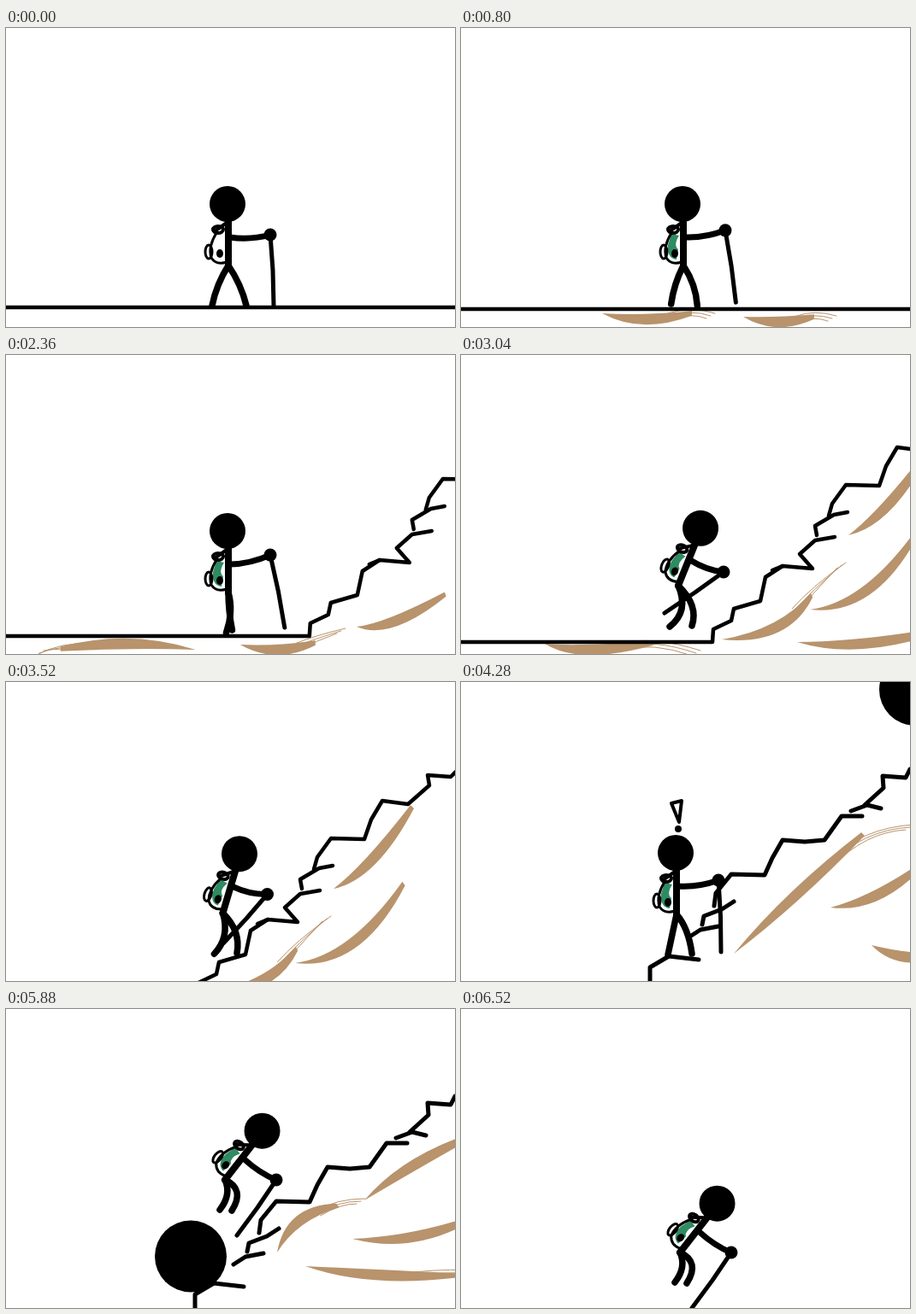
Write an HTML page with a canvas that moves like this. It is 525 px wide and 350 px high and loops after 6.56 s.

```html
<!DOCTYPE html>
<html lang="en">
<head>
<meta charset="utf-8">
<title>Stick hiker</title>
<style>
html, body { margin: 0; width: 100%; height: 100%; overflow: hidden; background: #fff; }
canvas { display: block; }
</style>
</head>
<body>
<canvas id="stage" width="525" height="350"></canvas>
<script>
const ctx = document.getElementById('stage').getContext('2d');
const LOOP = 6560, STEP = 40, BROWN = '#b8936c', GREEN = '#2f8b62';

const mix = (a, b, u) => a.map((v, i) => v + (b[i] - v) * u);

// Interpolates [time, values] keys linearly, holding both ends.
function at(keys, t) {
  const i = keys.findIndex(k => k[0] > t);
  if (i < 0) return keys[keys.length - 1][1];
  if (i === 0) return keys[0][1];
  const [t0, a] = keys[i - 1], [t1, b] = keys[i];
  return mix(a, b, (t - t0) / (t1 - t0));
}

// ---- scenery ----
const drift = [
  [0, [372, -9]], [80, [358, -7]], [800, [245, -7]], [1440, [145, -7]], [1840, [107, -7]],
  [2920, [11, -7]], [3040, [0, 0]], [3520, [-70, 31]]
];
const approach = [
  [-900, 336, 294, 336, 295, 321, 316, 311, 319, 297, 350, 288, 356, 260, 376, 247],
  [364, 252, 376, 247, 411, 250, 396, 233, 414, 217, 437, 213],
  [416, 211, 414, 200, 436, 187, 452, 184],
  [430, 188, 434, 174, 450, 152, 489, 153, 497, 130, 510, 108, 540, 112, 565, 90, 563, 78, 590, 80, 610, 60]
];
const slope = [
  [221, 356, 221, 334, 243, 321, 278, 325],
  [266, 299, 280, 290, 301, 286],
  [282, 284, 284, 274, 305, 266, 319, 257],
  [296, 262, 298, 247, 316, 225, 355, 226, 364, 206, 376, 185, 402, 187, 425, 185, 445, 157, 469, 157],
  [456, 151, 475, 144, 491, 148],
  [472, 144, 494, 124, 493, 110, 520, 112, 525, 102, 560, 96, 720, 50]
];

// Brush swipes: start, middle, end and optional tip of the dry bristles.
const earth = [
  { from: 80, ref: 800, swipes: [
    [165, 334, 214, 341, 270, 334, 292, 337], [330, 338, 370, 344, 413, 338, 434, 340]] },
  { from: 1520, ref: 1840, swipes: [
    [268, 345, 190, 338, 110, 344, 85, 349], [320, 339, 363, 345, 408, 337, 438, 323],
    [456, 318, 500, 312, 560, 280]] },
  { from: 2920, ref: 3040, swipes: [
    [98, 338, 150, 345, 225, 337, 275, 349], [305, 333, 368, 319, 410, 281, 445, 246],
    [453, 211, 497, 178, 545, 115], [408, 298, 475, 275, 535, 205], [393, 336, 470, 338, 560, 322]] },
  { from: 3600, swipes: [
    [319, 318, 391, 250, 470, 178, 525, 170], [432, 264, 485, 250, 540, 213],
    [480, 308, 515, 321, 560, 322]] },
  { from: 4600, swipes: [
    [317, 285, 343, 248, 388, 230, 415, 225], [419, 224, 475, 184, 545, 148],
    [405, 269, 475, 267, 545, 245], [350, 301, 430, 311, 525, 312, 545, 310]] }
];

function pen(width, color = '#000') {
  ctx.lineWidth = width;
  ctx.strokeStyle = ctx.fillStyle = color;
}

function line(pts, width) {
  pen(width);
  ctx.beginPath();
  for (let i = 0; i < pts.length; i += 2) ctx.lineTo(pts[i], pts[i + 1]);
  ctx.stroke();
}

function curve(x0, y0, cx, cy, x1, y1, width) {
  pen(width);
  ctx.beginPath();
  ctx.moveTo(x0, y0);
  ctx.quadraticCurveTo(cx, cy, x1, y1);
  ctx.stroke();
}

function oval(x, y, rx, ry = rx) {
  ctx.beginPath();
  ctx.ellipse(x, y, rx, ry, 0, 0, 7);
}

function disc(x, y, r, ry = r) {
  pen(1);
  oval(x, y, r, ry);
  ctx.fill();
}

function swipe([x0, y0, mx, my, x1, y1, hx, hy]) {
  const cx = 2 * mx - (x0 + x1) / 2, cy = 2 * my - (y0 + y1) / 2;
  const len = Math.hypot(x1 - x0, y1 - y0);
  const nx = (y0 - y1) / len * 11, ny = (x1 - x0) / len * 11;
  pen(1, BROWN);
  ctx.beginPath();
  ctx.moveTo(x0, y0);
  ctx.quadraticCurveTo(cx + nx, cy + ny, x1 + nx / 4, y1 + ny / 4);
  ctx.lineTo(x1 - nx / 4, y1 - ny / 4);
  ctx.quadraticCurveTo(cx - nx, cy - ny, x0, y0);
  ctx.fill();
  if (hx === undefined) return;
  for (let i = -1; i < 2; i++) {
    ctx.beginPath();
    ctx.moveTo((mx + x1) / 2 + nx * i / 3, (my + y1) / 2 + ny * i / 3);
    ctx.quadraticCurveTo(x1 + nx * i / 3, y1 + ny * i / 3 - 5, hx - i * 5, hy + i * 3);
    ctx.stroke();
  }
}

function scenery(t) {
  const base = at(drift, t);
  const late = t >= 3600;
  const drop = Math.max(0, (t - 5920) / 600) ** 1.5;
  const scene = late ? [-110 * drop, 320 * drop] : base;

  const set = earth.filter(e => e.from <= t).pop();
  if (set) {
    const ref = set.ref ? at(drift, set.ref) : [0, 0];
    const [x, y] = late ? scene : [base[0] - ref[0], base[1] - ref[1]];
    ctx.save();
    ctx.translate(x, y);
    set.swipes.forEach(swipe);
    ctx.restore();
  }
  ctx.save();
  ctx.translate(...scene);
  (late ? slope : approach).forEach(s => line(s, late ? 5 : 4.5));
  ctx.restore();
}

// ---- hiker: lean, then x/y of hip, hand, stick tip, knee and foot twice ----
const leap = [22, 254, 270, 307, 254, 238, 302, 267, 300, 244, 318, 278, 293, 270, 317];
const stand = [0, 252, 272, 301, 232, 304, 316, 247, 296, 242, 319, 266, 288, 270, 318];
const crouch = [16, 256, 278, 313, 257, 289, 338, 260, 297, 243, 320, 277, 288, 270, 318];
const tuck = [38, 256, 285, 316, 285, 270, 350, 264, 302, 250, 320, 280, 296, 264, 321];
const raised = tuck.map((v, i) => i && i % 2 === 0 ? v - 85 : v);

function walk(t) {
  const a = t / 720 * 2 * Math.PI, c = 20 * Math.cos(a), s = Math.sin(a);
  const up = Math.max(0, s), down = Math.max(0, -s);
  return [0, 260, 278, 309, 242 - 8 * up, 313 + 13 * up, 325 - 6 * up,
    258 - c * .6, 300, 261 - c, 325 - 3 * up,
    265 + c * .5 + 3 * up, 300, 261 + c, 325 - 3 * down];
}

const poses = [
  [2840, walk(2840)], [3040, leap], [3440, leap], [3760, stand], [4600, stand],
  [5240, crouch], [5400, crouch], [5680, raised], [5880, raised], [6520, tuck]
];

function bag(colored) {
  pen(3);
  ctx.beginPath();
  ctx.moveTo(-13, -40);
  ctx.quadraticCurveTo(-25, -22, -20, -9);
  ctx.quadraticCurveTo(-14, 0, -2, -4);
  ctx.lineTo(-2, -36);
  ctx.fillStyle = '#fff';
  ctx.fill();
  if (colored) {
    ctx.fillStyle = GREEN;
    ctx.beginPath();
    ctx.moveTo(-14, -37);
    ctx.lineTo(-5, -35);
    ctx.quadraticCurveTo(-12, -24, -6, -19);
    ctx.lineTo(-8, -7);
    ctx.quadraticCurveTo(-19, -8, -18, -24);
    ctx.fill();
  }
  ctx.beginPath();
  ctx.moveTo(-14, -38);
  ctx.quadraticCurveTo(-24, -22, -20, -9);
  ctx.quadraticCurveTo(-14, 0, -2, -4);
  ctx.stroke();
  oval(-23, -16, 4, 8);
  ctx.stroke();
  pen(4);
  oval(-12, -42, 6, 4);
  ctx.stroke();
  line([-16, -40, -2, -50], 4);
  disc(-10, -14, 4, 5);
}

function hiker(t) {
  const [lean, hx, hy, ax, ay, sx, sy, k1x, k1y, f1x, f1y, k2x, k2y, f2x, f2y] =
    t < 2840 ? walk(t) : at(poses, t);
  const a = lean * Math.PI / 180, sin = Math.sin(a), cos = Math.cos(a);
  const spot = (x, y) => [hx + x * cos - y * sin, hy + x * sin + y * cos];

  line([ax, ay, (ax + sx) / 2 + 1, (ay + sy) / 2, sx, sy], 5);
  curve(hx, hy, k1x, k1y, f1x, f1y, 7.5);
  curve(hx, hy, k2x, k2y, f2x, f2y, 7.5);

  ctx.save();
  ctx.translate(hx, hy);
  ctx.rotate(a);
  bag(t >= 80);
  line([0, -55, 0, 0], 8);
  ctx.restore();

  const [x, y] = spot(2, -33);
  curve(x, y, (x + ax) / 2, (y + ay) / 2 + 5, ax, ay, 7);
  disc(ax, ay, 7.5);
  const [headX, headY] = spot(-1, -72);
  disc(headX, headY, 21);

  if (t >= 4000 && t < 5560) {
    const tilt = lean / 5;
    line([-5, -58, 7, -61 + tilt, 4, -36, -5, -58].map((v, i) =>
      i % 2 ? headY + v : headX + v + tilt), 4);
    disc(headX + 3, headY - 28, 4);
  }
}

const boulder = [
  [3920, [575, -60]], [4280, [531, 9]], [4560, [495, 71]], [5240, [357, 133]],
  [5320, [342, 142]], [5920, [207, 300]], [6520, [134, 420]]
];

function draw(now) {
  const t = Math.floor(now % LOOP / STEP) * STEP;
  ctx.fillStyle = '#fff';
  ctx.fillRect(0, 0, 525, 350);
  ctx.lineCap = ctx.lineJoin = 'round';
  scenery(t);
  hiker(t);
  if (t >= 3920) disc(...at(boulder, t), 42);
  requestAnimationFrame(tick);
}

const start = performance.now();
function tick() { draw(performance.now() - start); }
tick();
</script>
</body>
</html>
```
